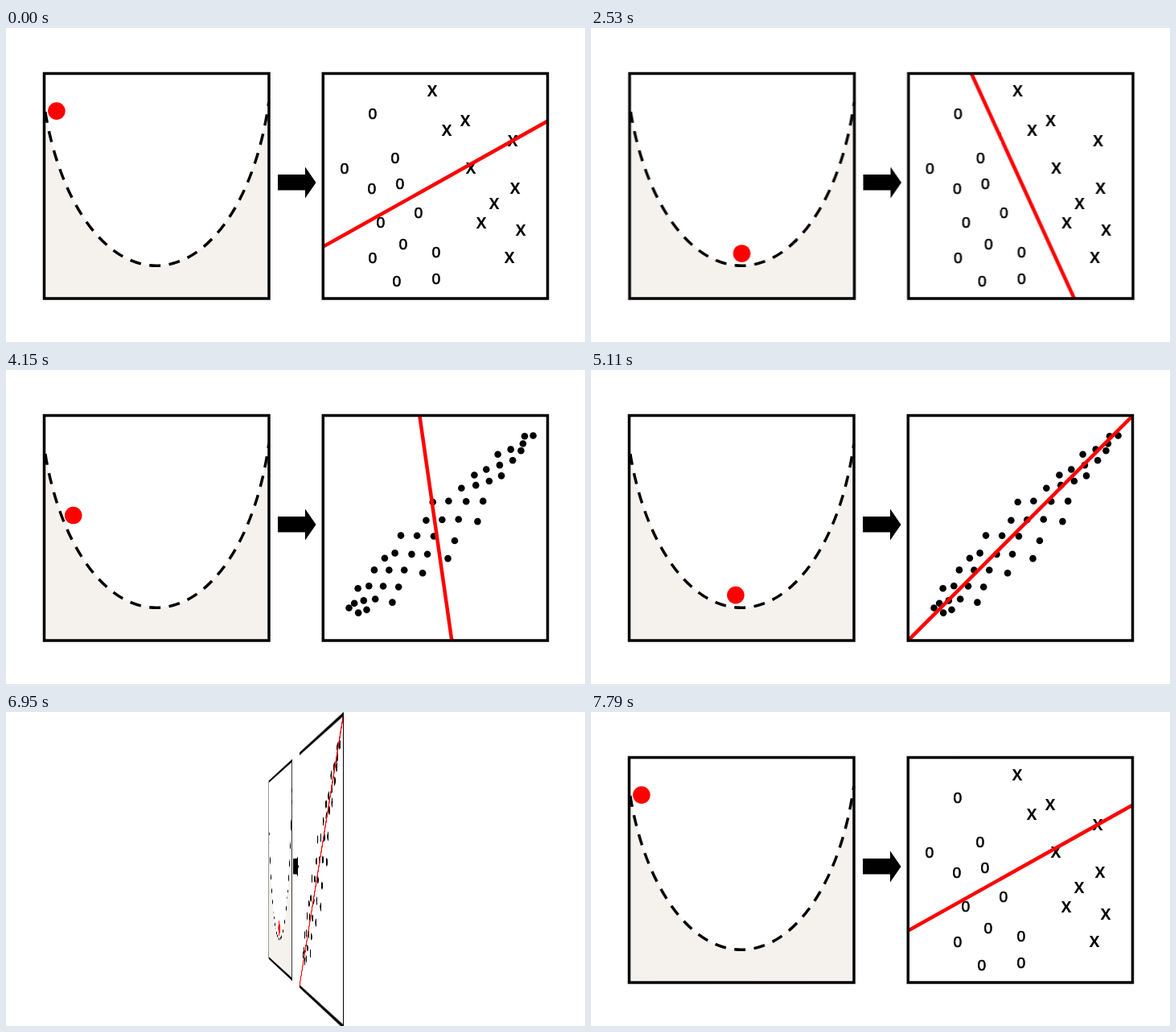
An HTML page that plays this animation: 720x390 px, repeating every 7820 ms.

```html
<!DOCTYPE html>
<html lang="en">
<head>
<meta charset="utf-8">
<title>Descent and fit</title>
<style>
  html, body { margin: 0; width: 100%; height: 100%; overflow: hidden; background: #fff; }
  svg { display: block; width: 720px; height: 390px; transform-origin: 360px 195px; }
  .frame { fill: none; stroke: #000; stroke-width: 3.5; }
  text { text-anchor: middle; }
  .o { font: 500 18px "Noto Sans Mono", monospace; stroke: #000; stroke-width: .6; }
  .x { font: 700 19px "Noto Sans", sans-serif; }
</style>
</head>
<body>
<svg id="stage" viewBox="0 0 720 390">
  <clipPath id="plot"><rect x="395" y="57" width="278" height="278"/></clipPath>
  <path d="M48.8 104A144.5 271 0 0 0 326.8 92V336H48.8Z" fill="#f5f2ee"/>
  <path d="M48.8 104A144.5 271 0 0 0 326.8 92" fill="none" stroke="#000" stroke-width="3.5" stroke-dasharray="14 10.5"/>
  <rect class="frame" x="47.5" y="56.5" width="279.5" height="279.5"/>
  <circle id="ball" r="10.8" fill="#f00"/>
  <path d="M338 182H372V172.5L385.5 192L372 211.5V201.5H338Z"/>
  <g id="classes"></g>
  <g id="cloud"></g>
  <g clip-path="url(#plot)"><path id="line" d="M-220 0H220" stroke="#f00" stroke-width="4.5"/></g>
  <rect class="frame" x="394.3" y="56.5" width="279.2" height="279.5"/>
</svg>
<script>
const $ = id => document.getElementById(id);
const stage = $('stage'), ball = $('ball'), line = $('line');
const groups = [$('classes'), $('cloud')];

// Two labelled classes, one point each
const noughts = '456,106 421,174 484,161 455,199 490,193 513,229 466,241 494,268 456,285 535,278 486,314 535,311';
const crosses = '530,78 571,115 548,127 630,140 578,174 633,199 607,218 591,242 640,251 626,285';
const label = (points, cls) => points.split(' ').map(p => {
  const [x, y] = p.split(',');
  return `<text class="${cls}" x="${x}" y="${+y + 6.6}">${cls.toUpperCase()}</text>`;
}).join('');
groups[0].innerHTML = label(noughts, 'o') + label(crosses, 'x');

// A correlated cloud: even steps along the rising diagonal, seeded scatter across it
let seed = 7;
const random = () => (seed = seed * 16807 % 2147483647) / 2147483647;
const DOTS = 46;
for (let i = 0; i < DOTS; i++) {
  const p = i / (DOTS - 1);
  const along = 131 + 443 * p ** 1.15;
  const spread = 120 * Math.sin(Math.PI * (.15 + .8 * p)) * (.4 + .6 * random());
  const across = 733 + spread * (i * .618 % 1 - .5);
  groups[1].innerHTML += `<circle cx="${(across + along) / 2}" cy="${(across - along) / 2}" r="4.3"/>`;
}

// Pivot of the fitted line, its first angle and its turn in degrees
const scenes = [
  { x: 535, y: 193, from: -29.2, turn: 94.6 },
  { x: 534.3, y: 196, from: 45, turn: 90 }
];

const HALF = 3910, ROLL = 20, FLIP = 2530, EDGE = 537;
const easeOut = p => 1 - (1 - Math.min(1, Math.max(0, p))) ** 2;

function drawScene(k, t) {
  groups.forEach((g, i) => g.style.display = i === k ? '' : 'none');
  const a = (18 + 72 * easeOut(t / 1490)) * Math.PI / 180;
  ball.setAttribute('cx', 187 - 130.5 * Math.cos(a));
  ball.setAttribute('cy', 24 + 256 * Math.sin(a));
  const s = scenes[k];
  line.setAttribute('transform', `translate(${s.x} ${s.y}) rotate(${s.from + s.turn * easeOut(t / 950)})`);
}

function render(now) {
  const t = now % (2 * HALF), u = t % HALF, v = u - FLIP;
  const k = t < HALF ? 0 : 1;
  const incoming = v >= EDGE;
  drawScene(incoming ? 1 - k : k, incoming ? 0 : u - ROLL);
  let angle = 0;
  if (incoming) angle = 90 * ((HALF - u) / (HALF - FLIP - EDGE)) ** 2.32;
  else if (v > 0) angle = -90 * (v / EDGE) ** 1.77;
  const shift = v >= 0 && !incoming ? .5 : 0;
  stage.style.transform = v >= 0 ? `perspective(1110px) rotateY(${angle}deg) translateX(${shift}px)` : 'none';
  stage.style.opacity = incoming ? 1 - angle / 180 : 1;
}

let start;
function tick(now) {
  start ??= now;
  render(now - start);
  requestAnimationFrame(tick);
}
render(0);
requestAnimationFrame(tick);
</script>
</body>
</html>
```
